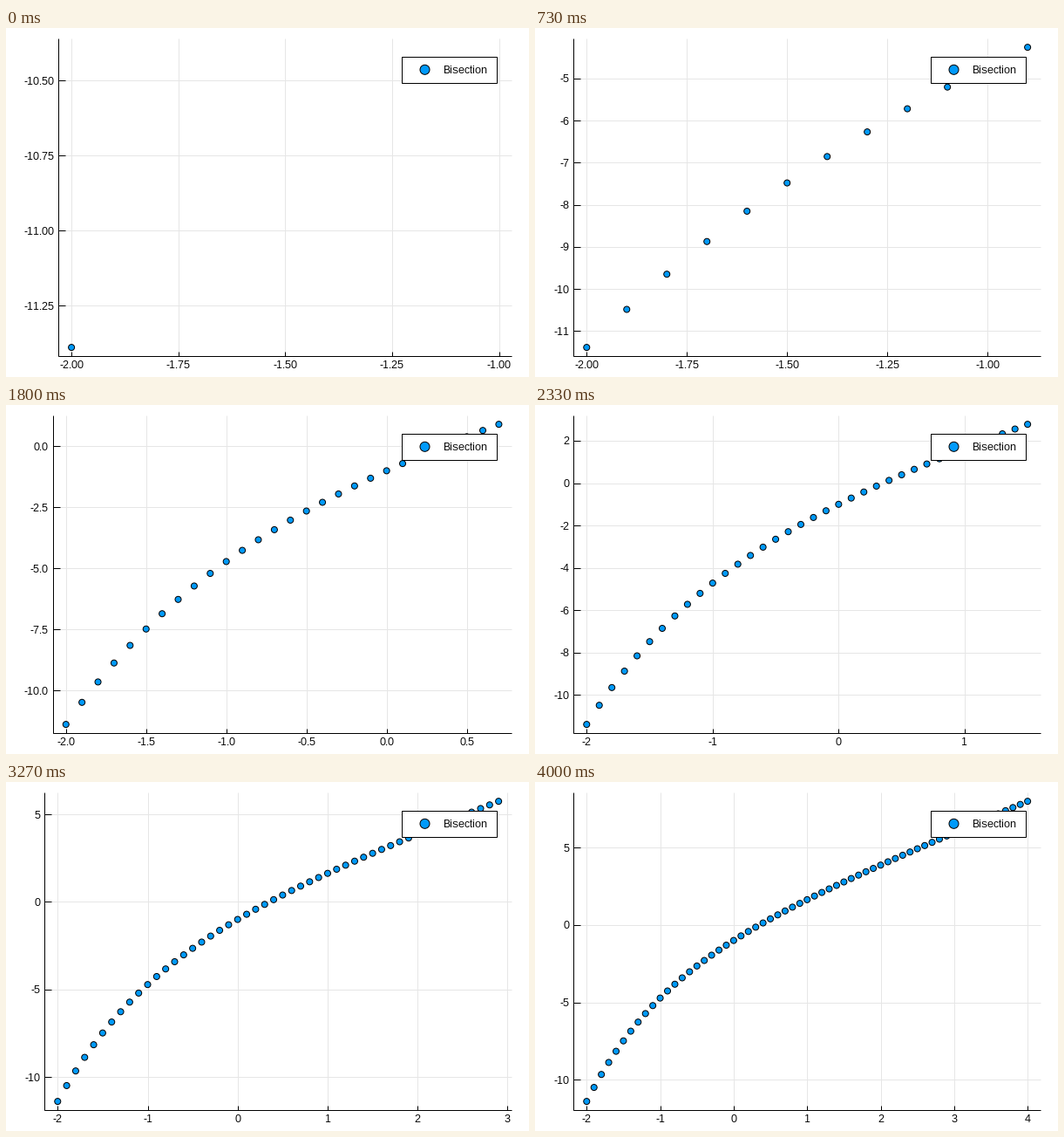
Recreate the animation shown at these times as a matplotlib script. Size 600 by 400 pixels, loop 4070 ms.

```python
import math

import matplotlib.pyplot as plt
import numpy as np
from matplotlib.animation import FuncAnimation
from matplotlib.patches import Rectangle

plt.rcParams.update({
    "font.family": "Liberation Sans",
    "text.hinting": "default",
    "text.hinting_factor": 1,
})

W, H, DPI = 600, 400, 100
PX = 72 / DPI                       # one pixel in points
TOP, RIGHT, BOTTOM = 11.8, 580.3, 376.4
LOOP, CLOCK = 4070, 10              # ms
STEP = 200 / 3                      # ms between two new points
BLUE = "#009afa"

xs = np.linspace(-2, 4, 61)
ys = 2 * xs - np.exp(-xs)


def limits(v):
    """Data range with a 3 % margin; a single value gets a unit range."""
    lo, hi = v.min(), v.max()
    if lo == hi:
        hi = lo + 1
    pad = 0.03 * (hi - lo)
    return lo - pad, hi + pad


def pick_ticks(lo, hi, k_min=4, k_max=8, ideal=5):
    """Score candidate tick sets by count, zero, coverage and roundness."""
    nice = ((1, 1.0), (5, 0.9), (2, 0.7), (2.5, 0.5), (3, 0.2))
    span = hi - lo
    z = math.ceil(math.log10(span))
    best, top = [], -math.inf
    while 2 * k_max * 10.0 ** (z + 1) > span:
        for k in range(k_min, 2 * k_max + 1):
            for q, quality in nice:
                step = q * 10.0 ** z
                width = (k - 1) * step
                if width < span:
                    continue
                r = math.ceil((hi - width) / step)
                while r * step <= lo:
                    t = [(r + i) * step for i in range(k)]
                    t = [v for v in t if lo <= v <= hi]
                    n = len(t)
                    if k_min <= n <= k_max:
                        score = (0.25 * (1 - abs(n - ideal) / ideal)
                                 + (r <= 0 and -r < k) / 6
                                 + 0.5 * span / ((n - 1) * step)
                                 + 0.25 * quality
                                 - 1000 * (width >= 2 * span))
                        if score > top + 1e-9:
                            best, top = t, score
                    r += 1
        z -= 1
    return best


def decimals(ticks):
    return next(d for d in range(6)
                if all(abs(round(t, d) - t) < 1e-9 for t in ticks))


def scene(n):
    """Pixel layout of the chart holding the first n points."""
    (x0, x1), (y0, y1) = limits(xs[:n]), limits(ys[:n])
    xt, yt = pick_ticks(x0, x1), pick_ticks(y0, y1)
    dx, dy = decimals(xt), decimals(yt)
    left = 44.1 + (3.2 + 6.55 * dy if dy else 0)

    def px(v):
        return left + (np.asarray(v) - x0) / (x1 - x0) * (RIGHT - left)

    def py(v):
        return BOTTOM - (np.asarray(v) - y0) / (y1 - y0) * (BOTTOM - TOP)

    return dict(left=left,
                points=np.column_stack([px(xs[:n]), py(ys[:n])]),
                xticks=px(xt), xlabels=[f"{t:.{dx}f}" for t in xt],
                yticks=py(yt), ylabels=[f"{t:.{dy}f}" for t in yt])


scenes = [scene(n) for n in range(1, len(xs) + 1)]

fig = plt.figure(figsize=(W / DPI, H / DPI), dpi=DPI, facecolor="white")
ax = fig.add_axes([0, 0, 1, 1])
ax.set(xlim=(0, W), ylim=(H, 0))
ax.axis("off")


def stroke(color, z):
    return ax.plot([], [], color=color, lw=PX, zorder=z, snap=True,
                   solid_capstyle="butt", solid_joinstyle="miter")[0]


def dots(x, y, size, z):
    d = ax.scatter(x, y, color=BLUE, edgecolors="black",
                   linewidths=PX, zorder=z)
    # Two equal sizes keep the marker positions from being rounded.
    d.set_sizes(np.full(2, (size * PX) ** 2))
    return d


def label(x, y, s, ha, z=4):
    return ax.text(x, y, s, ha=ha, va="baseline", size=12 * PX, zorder=z)


def set_segments(line, segs):
    """Draw separate (x0, y0, x1, y1) segments with one line artist."""
    gap = (np.nan, np.nan)
    pts = [p for a, b, c, d in segs for p in ((a, b), (c, d), gap)]
    line.set_data(*zip(*pts))


grid = stroke("0.9", 1)
frame_line = stroke("black", 2)
tick_lines = stroke("black", 2)
points = dots([0], [0], 7, 3)
xtexts = [label(0, 390, "", "center") for _ in range(8)]
ytexts = [label(0, 0, "", "right") for _ in range(8)]

# Legend
ax.add_patch(Rectangle((453.5, 32.5), 109, 30, fc="white", ec="black",
                       lw=PX, zorder=5, snap=True))
dots([480.5], [47.8], 11, 6)
label(501, 52, "Bisection", "left", 6)


def fill(texts, labels, places):
    for i, t in enumerate(texts):
        shown = i < len(labels)
        t.set_visible(shown)
        if shown:
            t.set_text(labels[i])
            t.set_position(places[i])


def update(tick):
    # The delays are rounded to whole clock ticks.
    n = int((tick * CLOCK + CLOCK / 2) / STEP)
    s = scenes[min(n, len(scenes) - 1)]
    left, xt, yt = s["left"], s["xticks"], s["yticks"]
    tx, ty = 0.015 * (RIGHT - left), 0.015 * (BOTTOM - TOP)

    set_segments(grid, [(x, TOP, x, BOTTOM) for x in xt]
                 + [(left, y, RIGHT, y) for y in yt])
    set_segments(tick_lines, [(x, BOTTOM, x, BOTTOM - ty) for x in xt]
                 + [(left, y, left + tx, y) for y in yt])
    frame_line.set_data([left, left, RIGHT], [TOP, BOTTOM, BOTTOM])
    points.set_offsets(s["points"])
    fill(xtexts, s["xlabels"], [(x, 390) for x in xt])
    fill(ytexts, s["ylabels"], [(left - 5, y + 4.5) for y in yt])


anim = FuncAnimation(fig, update, frames=LOOP // CLOCK, interval=CLOCK,
                     repeat=True, repeat_delay=0, blit=False,
                     cache_frame_data=False)
plt.show()
```
